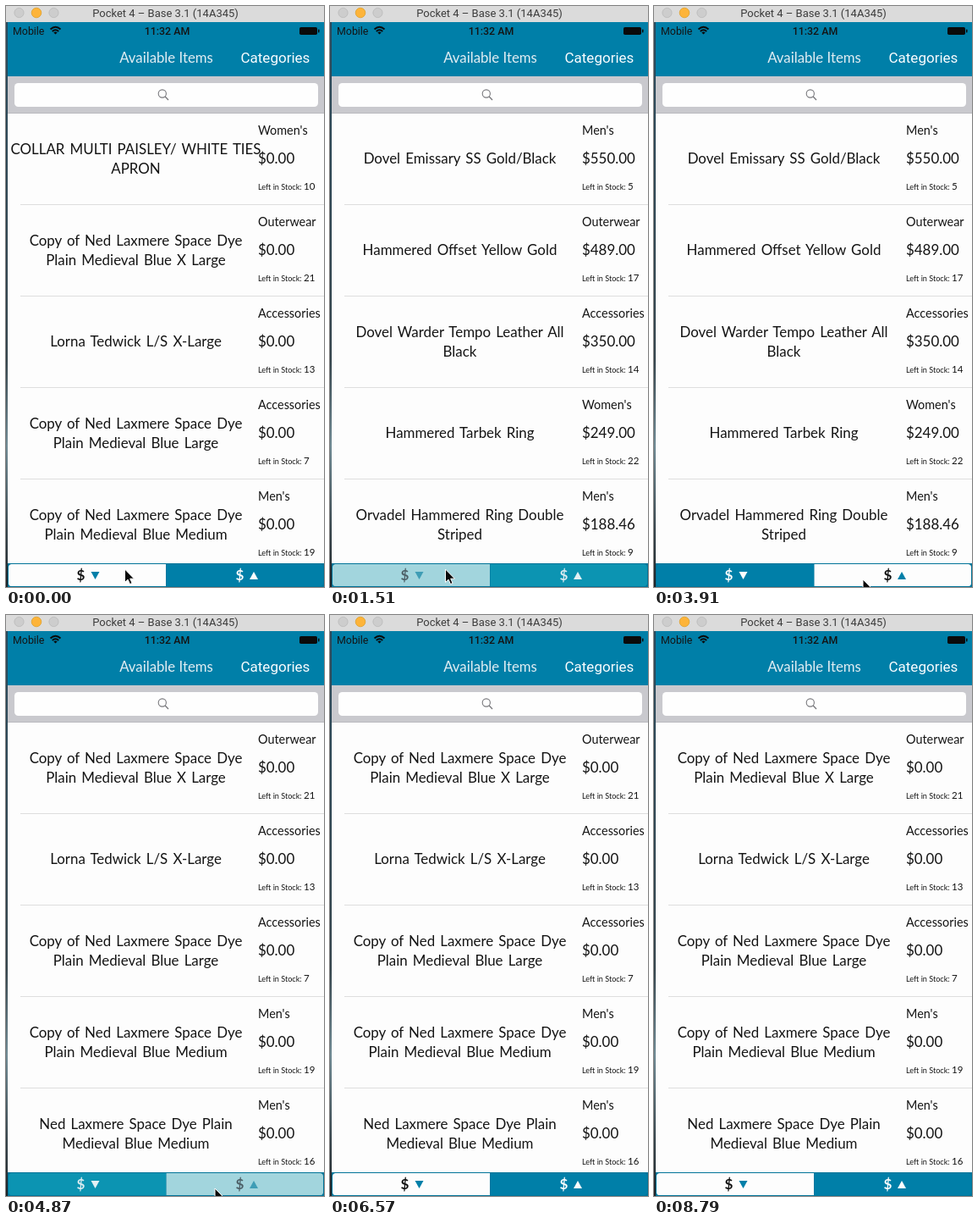
An HTML page for the animation above (8.81 s loop, 376 by 686 pixels).

```html
<!DOCTYPE html>
<html lang="en">
<head>
<meta charset="utf-8">
<title>Available Items</title>
<style>
  html, body { margin: 0; width: 100%; height: 100%; overflow: hidden; background: #fdfdfd; }
  svg { display: block; }
  text { font-family: Lato, "Open Sans", sans-serif; fill: #141414; white-space: pre; }
  .sys { font-family: Roboto, Inter, sans-serif; }
  .mid { text-anchor: middle; }
  .name { font-size: 16.9px; word-spacing: 1.8px; text-anchor: middle; }
  .cat { font-size: 14.4px; }
  .price { font-size: 16.9px; }
  .left { font-size: 9.1px; }
  .count { font-size: 11.5px; }
  .dollar { font-size: 17px; font-weight: 700; text-anchor: middle; }
</style>
</head>
<body>
<svg width="376" height="686" viewBox="0 0 376 686">
  <defs>
    <linearGradient id="desk" x2="0" y2="1">
      <stop offset="0" stop-color="#2a4a5c"/>
      <stop offset=".6" stop-color="#34444c"/>
      <stop offset=".75" stop-color="#6f8a94"/>
      <stop offset=".9" stop-color="#35434a"/>
      <stop offset="1" stop-color="#1c2226"/>
    </linearGradient>
  </defs>
  <rect width="376" height="686" fill="#fdfdfd"/>

  <!-- window bar -->
  <rect width="376" height="19" fill="#dbdbdb"/>
  <g stroke-width=".8">
    <circle cx="15.5" cy="8" r="5.6" fill="#cdcdcd" stroke="#b9b9b9"/>
    <circle cx="36" cy="8" r="5.8" fill="#fdb43a" stroke="#dfa02a"/>
    <circle cx="56.5" cy="8" r="5.6" fill="#cdcdcd" stroke="#b9b9b9"/>
  </g>
  <text class="sys mid" x="188.5" y="13" font-size="13" style="fill:#3c3c3c">Pocket 4 – Base 3.1 (14A345)</text>

  <!-- status and navigation -->
  <rect y="19" width="376" height="64" fill="#007fa8"/>
  <text class="sys" x="8" y="34" font-size="12.4">Mobile</text>
  <g fill="none" stroke="#0a0a0a" stroke-width="1.9">
    <path d="M52.5 27.5Q58.5 21.8 64.5 27.5M54.8 30Q58.5 26.4 62.2 30"/>
    <path d="M56.3 31.3Q58.5 29.5 60.7 31.3L58.5 33.6Z" fill="#0a0a0a" stroke="none"/>
  </g>
  <text class="sys mid" x="190.5" y="34" font-size="12.4" font-weight="500">11:32 AM</text>
  <rect x="347" y="25" width="21" height="9" rx="1.8" fill="#0a0a0a"/>
  <rect x="369" y="27.5" width="1.5" height="4" rx=".7" fill="#0a0a0a"/>
  <text class="mid" x="189.5" y="67" font-size="16.8" style="fill:#e2eef3">Available Items</text>
  <text class="sys" x="277.5" y="67" font-size="17" style="fill:#fafdff">Categories</text>

  <!-- search bar -->
  <rect y="83" width="376" height="44" fill="#c9c9ce"/>
  <path d="M0 126.5H376" stroke="#b9b9be"/>
  <rect x="10" y="91" width="359" height="28" rx="4.5" fill="#fefefe"/>
  <path d="M188.2 107L192 111" stroke="#77777b" stroke-width="1.3"/>
  <circle cx="184.8" cy="103.5" r="4.6" fill="none" stroke="#77777b" stroke-width="1.1"/>

  <path d="M17 234.5H376M17 342.5H376M17 450.5H376M17 558.5H376" stroke="#dedede"/>
  <g id="lists"></g>

  <!-- sort control -->
  <rect x="2" y="658" width="374" height="28" fill="#007398"/>
  <g id="tabs"></g>
  <rect x="2.5" y="658.5" width="373" height="27.5" rx="3.5" fill="none" stroke="#007398"/>

  <rect y="19" width="2" height="667" fill="url(#desk)"/>
  <path id="cursor" d="M0 0V15.5L3.6 12.2L6 17.6L8.6 16.5L6.2 11.2H11Z" fill="#0a0a0a" stroke="#fdfdfd"/>
</svg>
<script>
const $ = id => document.getElementById(id);
const LOOP = 8810;
const item = (name, cat, price, left) => ({ name, cat, price, left });

const free = [
  item('Copy of Ned Laxmere Space Dye|Plain Medieval Blue X Large', 'Outerwear', '0.00', 21),
  item('Lorna Tedwick L/S X-Large', 'Accessories', '0.00', 13),
  item('Copy of Ned Laxmere Space Dye|Plain Medieval Blue Large', 'Accessories', '0.00', 7),
  item('Copy of Ned Laxmere Space Dye|Plain Medieval Blue Medium', "Men's", '0.00', 19)
];
const lists = [
  [item('COLLAR MULTI PAISLEY/ WHITE TIES|APRON', "Women's", '0.00', 10), ...free],
  [
    item('Dovel Emissary SS Gold/Black', "Men's", '550.00', 5),
    item('Hammered Offset Yellow Gold', 'Outerwear', '489.00', 17),
    item('Dovel Warder Tempo Leather All|Black', 'Accessories', '350.00', 14),
    item('Hammered Tarbek Ring', "Women's", '249.00', 22),
    item('Orvadel Hammered Ring Double|Striped', "Men's", '188.46', 9)
  ],
  [...free, item('Ned Laxmere Space Dye Plain|Medieval Blue Medium', "Men's", '0.00', 16)]
];

const label = (cls, x, y, s) => `<text class="${cls}" x="${x}" y="${y}">${s}</text>`;

function row({ name, cat, price, left }, i) {
  const y = 127 + 108 * i;
  const lines = name.split('|');
  const top = y + 59 - 11.5 * (lines.length - 1);
  return lines.map((s, k) => label('name', 153.5, top + 23 * k, s)).join('') +
    label('cat', 298, y + 25, cat) +
    label('price', 298, y + 59, '$' + price) +
    label('left', 298, y + 89.5, 'Left in Stock:') +
    label('count', 352, y + 90, left);
}
$('lists').innerHTML = lists.map(l => `<g>${l.map(row).join('')}</g>`).join('');

$('tabs').innerHTML =
  `<g><path d="M6 659H189V685H6Q3 685 3 682V662Q3 659 6 659Z"/>
   ${label('dollar', 88.5, 678, '$')}<path d="M100.5 668H110.5L105.5 677Z"/></g>
   <g><path d="M189.5 659H372Q375 659 375 662V682Q375 685 372 685H189.5Z"/>
   ${label('dollar', 276.5, 678, '$')}<path d="M288 677H298L293 668Z"/></g>`;

// background, dollar sign, arrow
const looks = {
  off: ['#fdfdfd', '#101010', '#007fa8'],
  on: ['#007fa8', '#fdfdfd', '#fdfdfd'],
  pressed: ['#a2d5dd', '#4c5f66', '#3f9db5'],
  fading: ['#0c94b2', '#dcebf0', '#e2f0f4']
};
function paint(tab, look) {
  looks[look].forEach((c, i) => tab.children[i].style.fill = c);
}

// time, x, y of the pointer tip
const path = [
  [0, 140.5, 665], [900, 140.5, 665], [1350, 136.5, 665], [1900, 136.5, 665],
  [2790, 178.5, 667.5], [3700, 247, 677], [5100, 247, 677], [5700, 250, 692], [LOOP, 250, 692]
];
function pointer(t) {
  const i = path.findIndex(p => p[0] > t);
  const [a, b] = [path[i - 1], path[i]];
  const k = (t - a[0]) / (b[0] - a[0]);
  return [1, 2].map(n => a[n] + (b[n] - a[n]) * k);
}

function draw(now) {
  const t = now % LOOP;
  const shown = t < 1490 ? 0 : t < 4850 ? 1 : 2;
  [...$('lists').children].forEach((g, i) => g.style.display = i === shown ? '' : 'none');

  const [down, up] = $('tabs').children;
  const [left, right] =
    t < 1430 ? ['off', 'on'] :
    t < 1590 ? ['pressed', 'fading'] :
    t < 4790 ? ['on', 'off'] :
    t < 4950 ? ['fading', 'pressed'] : ['off', 'on'];
  paint(down, left);
  paint(up, right);

  $('cursor').setAttribute('transform', `translate(${pointer(t)})`);
}

const start = performance.now();
function tick() {
  draw(performance.now() - start);
  requestAnimationFrame(tick);
}
tick();
</script>
</body>
</html>
```
